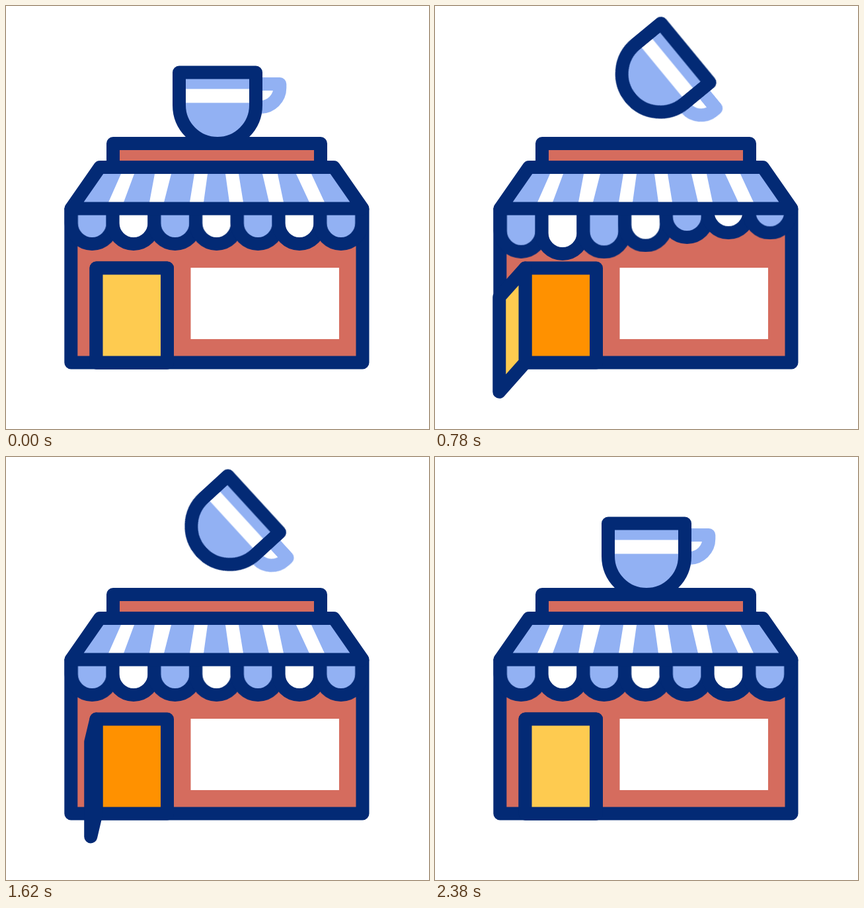
An HTML page without scripts that plays this animation: 640 by 640 pixels, repeating every 2.4 s.

```html
<!DOCTYPE html>
<html lang="en">
<head>
<meta charset="utf-8">
<title>Coffee shop</title>
<style>
  :root {
    --navy: #032a75;
    --blue: #92b1f3;
    --red: #d56c5e;
    --yellow: #fecb50;
    --orange: #ff9100;
  }
  html, body { margin: 0; width: 100%; height: 100%; overflow: hidden; background: #fff; }
  svg { display: block; width: 100%; height: 100%; }

  .line { stroke: var(--navy); stroke-width: 20; stroke-linejoin: round; stroke-linecap: round; }
  .blue { fill: var(--blue); }
  .red { fill: var(--red); }
  .white { fill: #fff; }
  .orange { fill: var(--orange); }
  .yellow { fill: var(--yellow); }
  .none { fill: none; }
  .handle { fill: none; stroke: var(--blue); stroke-width: 20; stroke-linejoin: round; }

  .cup, .leaf, .flap { animation: 2400ms infinite; }

  .cup { animation-name: tip; transform-origin: 379px 149.5px; }
  @keyframes tip {
    0% { transform: translate(0, 0) rotate(0deg); animation-timing-function: cubic-bezier(.884, 0, .153, .946); }
    46.667% { transform: translate(-.5px, -2px) rotate(55.5deg); animation-timing-function: cubic-bezier(.86, 0, .16, 1); }
    100% { transform: translate(0, 0) rotate(0deg); }
  }

  .leaf { animation-name: swing; }
  @keyframes swing {
    0% { d: path("M136.5 396.5L244 396.5L244 539.5L136.5 539.5Z"); animation-timing-function: cubic-bezier(.757, 0, .273, 1); }
    46.667% { d: path("M136.5 396.5L81.5 445L81.5 588.5L136.5 539.5Z"); animation-timing-function: cubic-bezier(.717, 0, .12, 1); }
    100% { d: path("M136.5 396.5L244 396.5L244 539.5L136.5 539.5Z"); }
  }

  .flap {
    animation-name: wave;
    animation-timing-function: ease-in-out;
    animation-delay: calc(var(--i) * 85ms);
  }
  @keyframes wave {
    0%, .8% { transform: translateY(0); }
    13.3% { transform: translateY(-17.5px); }
    28.5% { transform: translateY(15px); }
    41%, 100% { transform: translateY(0); }
  }
</style>
</head>
<body>
<svg viewBox="0 0 640 640">
  <defs>
    <path id="flap" class="line" d="M-31.4 280V328.6A31.4 31.4 0 0 0 31.4 328.6V280"/>
    <clipPath id="below"><path d="M60 306H580V420H60Z"/></clipPath>
  </defs>

  <g class="cup">
    <path class="handle" d="M378 118H414.3V124A30 29 0 0 1 385 153H378"/>
    <path class="blue" d="M262 100.5H378V150A58 58 0 0 1 262 150Z"/>
    <path class="white" d="M262 125.5H378V146.5H262Z"/>
    <path class="line none" d="M262 100.5H378V150A58 58 0 0 1 262 150Z"/>
  </g>

  <path class="line red" d="M162 208H476V250H162Z"/>
  <path class="line red" d="M98.3 307H539.5V539.5H98.3Z"/>
  <path class="white" d="M279.5 396H504V504H279.5Z"/>

  <g clip-path="url(#below)">
    <use href="#flap" x="130.3" class="flap blue" style="--i:0"/>
    <use href="#flap" x="193" class="flap white" style="--i:1"/>
    <use href="#flap" x="255.8" class="flap blue" style="--i:2"/>
    <use href="#flap" x="318.6" class="flap white" style="--i:3"/>
    <use href="#flap" x="381.3" class="flap blue" style="--i:4"/>
    <use href="#flap" x="444" class="flap white" style="--i:5"/>
    <use href="#flap" x="506.8" class="flap blue" style="--i:6"/>
  </g>

  <path class="blue" d="M142 244H496L539.5 306.5H98.5Z"/>
  <path class="white" d="M174 254H194L178 297H155ZM225 254H250L239 297H217ZM285 254H305L299 297H278ZM332 254H352L359 297H338ZM388 254H411L420 297H398ZM439 254H462L482 297H459Z"/>
  <path class="line none" d="M142 244H496L539.5 306.5H98.5Z"/>

  <path class="line orange" d="M136.5 396.5H244V539.5H136.5Z"/>
  <path class="line yellow leaf" d="M136.5 396.5L244 396.5L244 539.5L136.5 539.5Z"/>
</svg>
</body>
</html>
```
